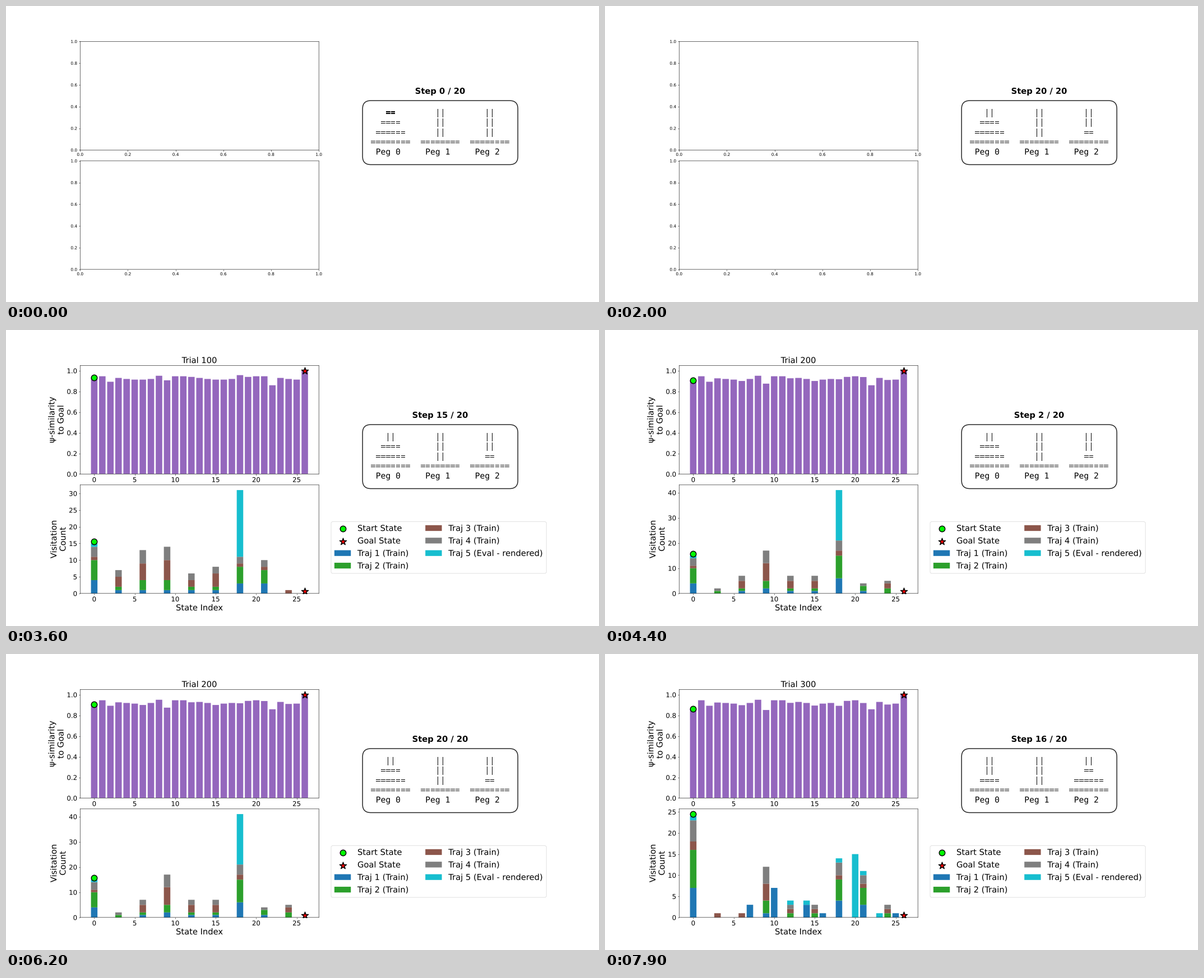
A matplotlib script for the animation above (8000 ms loop, 1058 by 529 pixels).

```python
import math

import matplotlib.pyplot as plt
from matplotlib.animation import FuncAnimation
from matplotlib.patches import FancyBboxPatch
from matplotlib.patheffects import Normal

W, H, DPI = 1058, 529, 52.9
STEPS = 20
N_STATES = 27
GOAL = N_STATES - 1
BIG, MID = 20, 16
EM = BIG * DPI / 72

# text drawn as outlines and nothing snapped: places hold to a part of a pixel
plt.rcParams.update({"font.family": "DejaVu Sans", "text.hinting": "none",
                     "path.snap": False, "path.effects": [Normal()]})

COLORS = ["tab:blue", "tab:green", "tab:brown", "tab:gray", "tab:cyan"]
LABELS = [f"Traj {i} (Train)" for i in range(1, 5)]
LABELS.append("Traj 5 (Eval - rendered)")

# states of the rendered run; the last one is held
SHORT = [0, 18]
LONG = [0, 18, 21, 12, 14, 23, 20]
PATHS = [SHORT, SHORT, SHORT, LONG]


def state_at(path, step):
    return path[min(step, len(path) - 1)]


def board_rows(state):
    """Text rows of the pegs; base-3 digits give each disk's peg."""
    pegs = [[], [], []]
    for size, peg in ((6, state % 3), (4, state // 3 % 3), (2, state // 9)):
        pegs[peg].append("=" * size)
    rows = []
    for level in (2, 1, 0):
        cells = [p[level] if level < len(p) else "||" for p in pegs]
        rows.append("  ".join(c.center(8) for c in cells))
    rows.append("  ".join(["=" * 8] * 3))
    rows.append("  ".join(f"Peg {i}".center(8) for i in range(3)))
    return rows


def first_similarity():
    """A slow wave over the states with a few outliers."""
    sim = [.93 + .017 * math.cos(math.tau * (s - 10.5) / 10)
           for s in range(N_STATES)]
    for s, v in {0: .932, 2: .893, 8: .951, 9: .907, 18: .957, 22: .859,
                 GOAL: 1}.items():
        sim[s] = v
    return sim


def train_visits(by_small, others=()):
    """Visits of all training runs; the list covers every third state."""
    visits = dict(zip(range(0, N_STATES, 3), by_small))
    visits.update(others)
    return visits


def shares(state):
    """How the four training runs share the visits to a state."""
    if state % 3:
        return .999, 0, 0, .001
    if state in (0, 18, 21):
        return .3, .4, .1, .2
    return .1, .2, .4, .3


def stack_edges(visits, path):
    """Edges between the stacked runs for each state."""
    edges = {}
    for s in range(N_STATES):
        n = visits.get(s, 0)
        a, b, c, _ = shares(s)
        held = sum(state_at(path, k) == s for k in range(STEPS + 1))
        edges[s] = [0, round(n * a), round(n * (a + b)),
                    round(n * (a + b + c)), n, n + held]
    return edges


fig = plt.figure(figsize=(W / DPI, H / DPI), dpi=DPI, facecolor="white")
grid = fig.add_gridspec(2, 2, width_ratios=[1.2, 1], wspace=.1, hspace=.1)


def new_axes():
    return [fig.add_subplot(grid[row, 0]) for row in (0, 1)]


def mark(ax, start, goal):
    style = dict(edgecolors="black", linewidths=2, zorder=5)
    return [ax.scatter(0, start, s=200, c="lime", label="Start State", **style),
            ax.scatter(GOAL, goal, s=300, c="red", marker="*",
                       label="Goal State", **style)]


def trial_axes(name, sim, visits, path, tick):
    top, low = new_axes()
    top.bar(range(N_STATES), sim, color="tab:purple")
    mark(top, sim[0], sim[GOAL])
    top.set_title(name, fontsize=BIG)
    top.set_ylim(0, 1.05)
    top.set_yticks([.2 * i for i in range(6)])
    top.set_ylabel("ψ-similarity\nto Goal", fontsize=BIG, linespacing=1.25)

    edges = stack_edges(visits, path)
    bars = []
    for run, (label, color) in enumerate(zip(LABELS, COLORS)):
        part = {s: e for s, e in edges.items() if e[run + 1] > e[run]}
        bars.append(low.bar(list(part),
                            [e[run + 1] - e[run] for e in part.values()],
                            bottom=[e[run] for e in part.values()],
                            color=color, label=label))
    highest = max(e[-1] for e in edges.values())
    lift = .02 * highest
    start = edges[0][-1] + lift
    marks = mark(low, start, lift)
    limit = 1.05 * max(highest, start)
    low.set_ylim(0, limit)
    low.set_yticks(range(0, int(limit) + 1, tick))
    low.set_xlabel("State Index", fontsize=BIG)
    low.set_ylabel("Visitation\nCount", fontsize=BIG, linespacing=1.25)

    for ax in (top, low):
        ax.set_xlim(-1.74, 27.74)
        ax.set_xticks(range(0, N_STATES, 5))
        ax.tick_params(labelsize=MID)
    return [top, low], marks + bars


trials = [
    (train_visits([14, 7, 13, 14, 6, 8, 11, 10, 1]), 5),
    (train_visits([14, 2, 7, 17, 7, 7, 21, 4, 5]), 10),
    (train_visits([23, 1, 1, 12, 3, 3, 13, 10, 3],
                  {7: 3, 10: 7, 14: 3, 16: 1, 25: 1}), 5),
]
scenes = [new_axes()]
sim = first_similarity()
for i, (visits, tick) in enumerate(trials, 1):
    if i > 1:
        # often visited states drift away from the goal
        sim = [v - .0019 * visits.get(s, 0) * (s % 3 == 0)
               for s, v in enumerate(sim)]
    axes, handles = trial_axes(f"Trial {100 * i}", sim, visits, PATHS[i], tick)
    scenes.append(axes)

legend = fig.legend(handles=handles, ncols=2, fontsize=BIG, loc="upper left",
                    bbox_to_anchor=(580 / W, 1 - 342.6 / H),
                    borderaxespad=0, labelspacing=.6)

# peg board on the right
MID_X, MID_Y = 774.7, H - 226.3
BOARD_W, BOARD_H = 28 * .602 * EM, 85
box = FancyBboxPatch((0, 0), 1, 1, transform=None, facecolor="white",
                     boxstyle=f"round,pad={EM},rounding_size={EM}",
                     edgecolor="#222222", linewidth=2)
fig.add_artist(box)
left = MID_X - BOARD_W / 2
lines = [fig.text(left / W, 1 - (195.1 + 17.6 * i) / H, "", fontsize=BIG,
                  family="DejaVu Sans Mono") for i in range(5)]
title = fig.text(MID_X / W, 1 - 156.9 / H, "", fontsize=BIG,
                 weight="bold", ha="center")


def update(frame):
    trial, step = divmod(frame, STEPS + 1)
    for i, axes in enumerate(scenes):
        for ax in axes:
            ax.set_visible(i == trial)
    legend.set_visible(trial > 0)
    title.set_text(f"Step {step} / {STEPS}")
    rows = board_rows(state_at(PATHS[trial], step))
    for line, row in zip(lines, rows):
        line.set_text(row)
    # a row without bars is slightly lower, so the box shrinks a little
    height = BOARD_H - .5 * sum("|" not in row for row in rows[:3])
    box.set_bounds(left, MID_Y - height / 2, BOARD_W, height)
    return []


anim = FuncAnimation(fig, update, frames=80, interval=100, repeat=True,
                     repeat_delay=0, init_func=lambda: update(0), blit=False)
plt.show()
```
